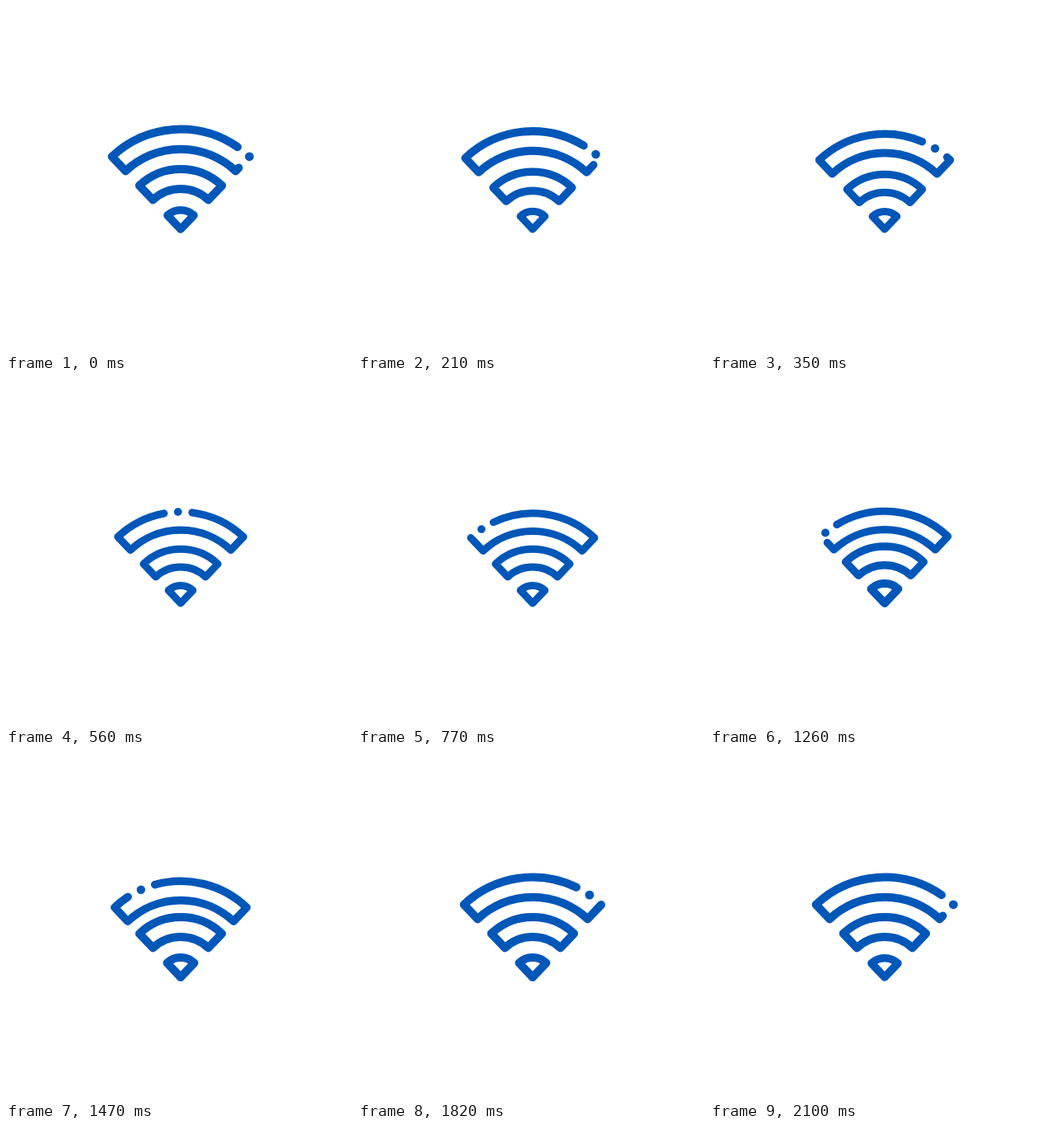
Recreate the animation shown at these times as an HTML page. Size 420x420 px, loop 2170 ms.

```html
<!DOCTYPE html>
<html lang="en">
<head>
<meta charset="utf-8">
<title>Signal</title>
<style>
  html, body { margin: 0; width: 100%; height: 100%; overflow: hidden; background: #fff; }
  svg { display: block; width: 100%; height: 100%; }
  path { fill: none; stroke: #0057b8; stroke-width: 10; stroke-linecap: round; stroke-linejoin: round; }
  circle { fill: #0057b8; }
</style>
</head>
<body>
<svg viewBox="0 0 420 420">
  <g id="outer"><path/><circle r="5.4"/></g>
  <g id="mid"><path/></g>
  <g id="small"><path/></g>
</svg>
<script>
const LOOP = 2170, STEP = 70, CYCLE = 2100, HALF = CYCLE / 2;
const TIP = [212, 271];
const SPREAD = 43.4 * Math.PI / 180;
const R1 = 121.4, R2 = 97.2, GAP = 18.7;
const LENGTH = 2 * SPREAD * (R1 + R2) + 2 * (R1 - R2);

const [outer, mid, small] = ["outer", "mid", "small"].map(id => document.getElementById(id));
const line = outer.querySelector("path");
const dot = outer.querySelector("circle");

const polar = (r, a) => [r * Math.sin(a), -r * Math.cos(a)];
const point = (r, a) => polar(r, a).map(v => v.toFixed(3)).join(" ");

// Closed band between two radii; an inner radius of 0 gives a wedge.
function band(r, inner) {
  const top = `M${point(r, -SPREAD)}A${r} ${r} 0 0 1 ${point(r, SPREAD)}`;
  return inner
    ? `${top}L${point(inner, SPREAD)}A${inner} ${inner} 0 0 0 ${point(inner, -SPREAD)}Z`
    : `${top}L0 0Z`;
}

const clamp = x => Math.min(1, Math.max(0, x));
const smooth = x => x * x * (3 - 2 * x);

// Cubic Bezier easing with handles at (a, 0) and (b, 1).
function ease(x, a, b) {
  let lo = 0, hi = 1;
  for (let i = 0; i < 30; i++) {
    const s = (lo + hi) / 2, q = 1 - s;
    if (3 * q * q * s * a + 3 * q * s * s * b + s * s * s < x) lo = s; else hi = s;
  }
  return lo * lo * (3 - 2 * lo);
}

// Shrinks to 90 % in one half of the cycle and grows back in the other.
function size(t, lead, duration) {
  const u = (t + lead) % CYCLE;
  const p = smooth(clamp((u % HALF) / duration));
  return u < HALF ? 1 - 0.1 * p : 0.9 + 0.1 * p;
}

function place(group, scale) {
  group.setAttribute("transform", `translate(${TIP}) scale(${scale})`);
}

function draw(t) {
  place(outer, size(t, 0, 730));
  place(mid, size(t, 0, 450));
  place(small, size(t, 150, 400));

  const p = ease((t % HALF) / HALF, 0.67, 0.4);
  const angle = SPREAD * (t < HALF ? 1 - 2 * p : 2 * p - 1);
  const [x, y] = polar(R1, angle);
  dot.setAttribute("cx", x);
  dot.setAttribute("cy", y);
  line.setAttribute("stroke-dashoffset", -(R1 * (angle + SPREAD) + GAP));
}

line.setAttribute("d", band(R1, R2));
line.setAttribute("stroke-dasharray", `${LENGTH - 2 * GAP} ${2 * GAP}`);
mid.firstChild.setAttribute("d", band(73, 49));
small.firstChild.setAttribute("d", band(24, 0));

const start = performance.now();
function tick() {
  const t = (performance.now() - start) % LOOP;
  draw(Math.floor(t / STEP) * STEP % CYCLE);
  requestAnimationFrame(tick);
}
tick();
</script>
</body>
</html>
```
